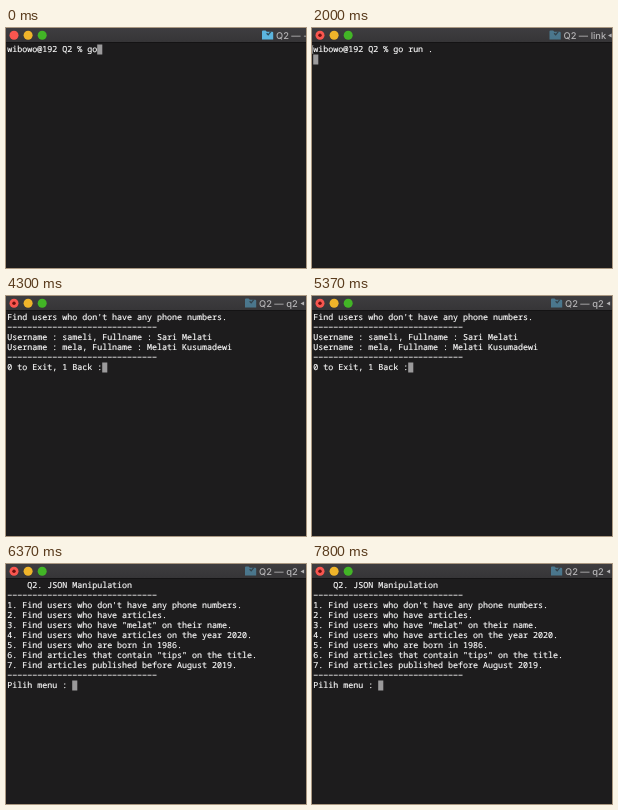
An HTML page that plays this animation: 300 by 240 pixels, repeating every 8000 ms.

```html
<!DOCTYPE html>
<html lang="en">
<head>
<meta charset="utf-8">
<title>Terminal</title>
<style>
  html, body { margin: 0; width: 100%; height: 100%; overflow: hidden; background: #1d1c1d; }
  svg { display: block; }
  text { text-rendering: geometricPrecision; white-space: pre; }
  #label { font: 500 9.3px Inter, Roboto, sans-serif; fill: #b4b3b5; }
  #screen {
    font: 500 8.333px "Noto Sans Mono", "DejaVu Sans Mono", monospace;
    fill: #fff; stroke: #fff; stroke-width: .15px;
  }
</style>
</head>
<body>
<svg width="300" height="240" viewBox="0 0 300 240">
  <defs>
    <linearGradient id="metal" x2="0" y2="1">
      <stop stop-color="#3e3d40"/>
      <stop offset="1" stop-color="#363537"/>
    </linearGradient>
  </defs>
  <rect width="300" height="240" fill="#1d1c1d"/>
  <rect width="300" height="14" fill="url(#metal)"/>
  <rect y="14" width="300" height="1" fill="#141314"/>
  <circle cx="8" cy="7.2" r="4.5" fill="#f9564f"/>
  <circle cx="22.1" cy="7.2" r="4.5" fill="#efb42a"/>
  <circle cx="36.2" cy="7.2" r="4.5" fill="#42b526"/>
  <circle id="dot" cx="8" cy="7.2" r="1.7" fill="#6b0f0d"/>
  <g id="title">
    <g id="folder">
      <path d="M0 3.5q0-1 1-1h2.6l1.2 1.2h5.4q1 0 1 1v6.8H0z" fill="#5cb5de"/>
      <path d="M4.6 5.2l1.6 1.6 2.6-3.2" fill="none" stroke="#2c4a5a" stroke-width="1.3"/>
    </g>
    <text id="label" x="14" y="10.5"></text>
    <path id="arrow" d="M0 7.5l3.6-2v4z" fill="#b4b3b5"/>
  </g>
  <path id="mark" d="M1.3 17.5H.5v8h.8" fill="none" stroke="#858485"/>
  <rect id="cursor" width="5.1" height="10" fill="#9b9a9b"/>
  <g id="screen"></g>
</svg>
<script>
const $ = id => document.getElementById(id);
const rule = "−".repeat(30);

const prompt = "wibowo@192 Q2 % go";
const menu = [
  "    Q2. JSON Manipulation", rule,
  "1. Find users who don't have any phone numbers.",
  "2. Find users who have articles.",
  '3. Find users who have "melat" on their name.',
  "4. Find users who have articles on the year 2020.",
  "5. Find users who are born in 1986.",
  '6. Find articles that contain "tips" on the title.',
  "7. Find articles published before August 2019.",
  rule, "Pilih menu : "
].join("\n");

const user = (name, full) => `Username : ${name}, Fullname : ${full}`;
const result = (heading, ...users) =>
  [heading, rule, ...users, rule, "0 to Exit, 1 Back :"].join("\n");

const pair = [user("sameli", "Sari Melati"), user("mela", "Melati Kusumadewi")];
const noPhone = result("Find users who don't have any phone numbers.", ...pair);
const withArticles = result("Find users who have articles.",
  user("wuland47", "Wulandari Hadin"), ...pair);

// [start in ms, screen text]; the cursor sits after the last character
const screens = [
  [0, prompt], [130, prompt + " "], [470, prompt + " r"], [530, prompt + " ru"],
  [670, prompt + " run"], [800, prompt + " run "], [1100, prompt + " run ."],
  [1370, prompt + " run .\n"],
  [2830, menu], [3970, menu + "1"],
  [4300, noPhone], [5970, noPhone + "1"],
  [6270, menu], [6870, menu + "2"],
  [7030, withArticles], [7540, withArticles + "1"],
  [7700, menu]
];

// [start in ms, left edge, label, arrow offset]
const titles = [
  [0, 256, "Q2 — -zsh"],
  [1400, 248, "Q2 — go run ."],
  [1830, 237.5, "Q2 — link", 58.5],
  [2600, 239, "Q2 — q2", 55.5]
];

const at = (track, t) => track.findLast(step => step[0] <= t);
const show = (id, on) => $(id).style.display = on ? "" : "none";
const place = (id, x, y) => $(id).setAttribute("transform", `translate(${x} ${y})`);

const cell = { left: 1.2, top: 16.5, width: 5, height: 10, baseline: 7.9 };
let shownScreen, shownTitle;

function textLine(content, row) {
  const line = document.createElementNS("http://www.w3.org/2000/svg", "text");
  line.setAttribute("x", cell.left);
  line.setAttribute("y", cell.top + row * cell.height + cell.baseline);
  line.textContent = content;
  return line;
}

function showScreen([start, text]) {
  const rows = text.split("\n");
  $("screen").replaceChildren(...rows.map(textLine));
  place("cursor", cell.left + rows.at(-1).length * cell.width,
    cell.top + (rows.length - 1) * cell.height);
  show("mark", start === 1370);
}

function showTitle([start, x, label, arrow]) {
  place("title", x, 0);
  $("label").textContent = label;
  show("arrow", arrow);
  place("arrow", arrow || 0, 0);
  show("dot", start);
  $("folder").style.opacity = start ? .5 : 1;
}

const begin = performance.now();
function draw() {
  const t = (performance.now() - begin) % 8000;
  const screen = at(screens, t), title = at(titles, t);
  if (screen !== shownScreen) showScreen(shownScreen = screen);
  if (title !== shownTitle) showTitle(shownTitle = title);
  requestAnimationFrame(draw);
}
draw();
</script>
</body>
</html>
```
